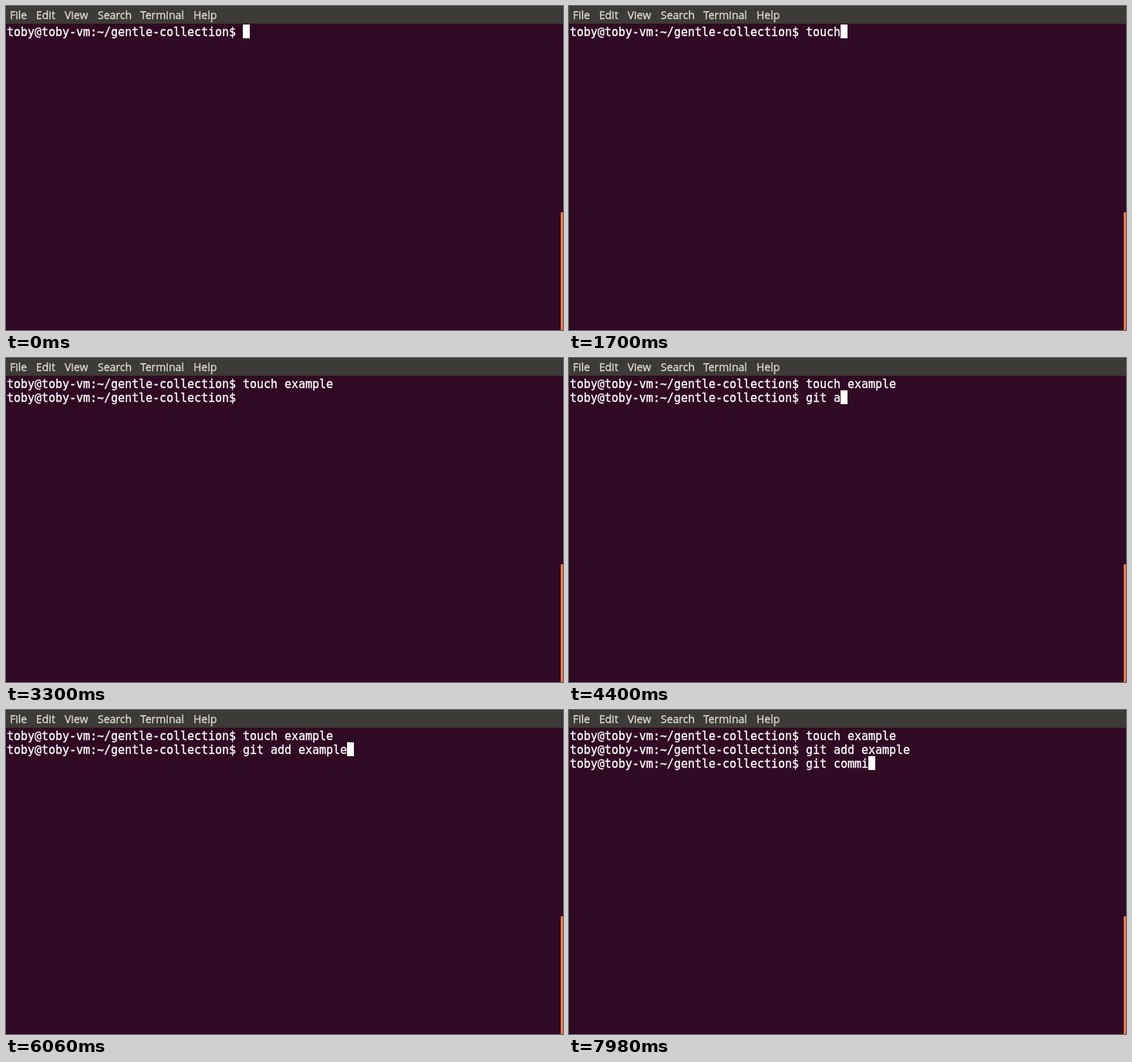
Write an HTML page that moves like this. It is 722 px wide and 421 px high and loops after 8 s.

```html
<!DOCTYPE html>
<html lang="en">
<head>
<meta charset="utf-8">
<title>Terminal</title>
<style>
  html, body { margin: 0; width: 100%; height: 100%; overflow: hidden; background: #300a24; }
  svg { display: block; width: 722px; height: 421px; }
  text { white-space: pre; stroke-width: 0.3px; }
  .menu { font: 14px "Open Sans", "Noto Sans", sans-serif; fill: #dfdbd2; stroke: #dfdbd2; }
  .shell { font: 15px "DejaVu Sans Mono", monospace; letter-spacing: -0.03px; fill: #fff; stroke: #fff; }
</style>
</head>
<body>
<svg viewBox="0 0 722 421">
  <rect width="722" height="421" fill="#300a24"/>
  <rect width="722" height="23" fill="#3c3b37"/>
  <g class="menu">
    <text x="5" y="17">File</text>
    <text x="39" y="17">Edit</text>
    <text x="76" y="17">View</text>
    <text x="119" y="17">Search</text>
    <text x="174" y="17">Terminal</text>
    <text x="243" y="17">Help</text>
  </g>
  <rect x="719" y="268" width="3" height="153" fill="#e9764b"/>
  <g class="shell" id="shell"></g>
  <rect id="cursor" width="9" height="18" fill="#fff"/>
</svg>
<script>
  const LOOP = 8000, CELL = 9, ROW = 18, LEFT = 1, TOP = 24, BASELINE = 15;
  const KEY_GAP = 90;                          // ms between keys within a burst
  const BLINK_DELAY = 500, BLINK_HALF = 1860;
  const PROMPT = "toby@toby-vm:~/gentle-collection$ ";

  // Each command is typed in quick bursts, with pauses to think between them.
  const commands = [
    { start: 0, bursts: { 1320: "touch e", 2090: "x", 2270: "am", 2560: "ple" } },
    { start: 3300, bursts: { 3870: "git ", 4350: "ad", 4570: "d ", 5230: "e", 5420: "x", 5610: "am", 5880: "ple" } },
    { start: 6460, bursts: { 6840: "git ", 7260: "co", 7500: "m", 7670: "m", 7980: "i" } }
  ];

  const shell = document.getElementById("shell");
  const cursor = document.getElementById("cursor");

  for (const [row, command] of commands.entries()) {
    command.keys = Object.entries(command.bursts).flatMap(([at, text]) =>
      [...text].map((char, i) => ({ char, time: Number(at) + i * KEY_GAP })));
    command.line = document.createElementNS("http://www.w3.org/2000/svg", "text");
    command.line.setAttribute("x", LEFT);
    command.line.setAttribute("y", TOP + row * ROW + BASELINE);
    shell.appendChild(command.line);
  }

  function setText(line, value) {
    if (line.textContent !== value) line.textContent = value;
  }

  // The screen is only repainted on a key press, so the blink is sampled then.
  function cursorVisible(lastKey) {
    return Math.floor(Math.max(0, lastKey - BLINK_DELAY) / BLINK_HALF) % 2 === 0;
  }

  function draw(t) {
    let lastKey = 0;
    commands.forEach(({ start, keys, line }, row) => {
      if (t < start) return setText(line, "");
      const typed = keys.filter(key => key.time <= t);
      const shown = PROMPT + typed.map(key => key.char).join("");
      setText(line, shown);
      cursor.setAttribute("x", LEFT + shown.length * CELL);
      cursor.setAttribute("y", TOP + row * ROW);
      lastKey = typed.length ? typed[typed.length - 1].time : start;
    });
    cursor.setAttribute("visibility", cursorVisible(lastKey) ? "visible" : "hidden");
  }

  function tick() {
    draw(performance.now() % LOOP);
    requestAnimationFrame(tick);
  }
  tick();
</script>
</body>
</html>
```
